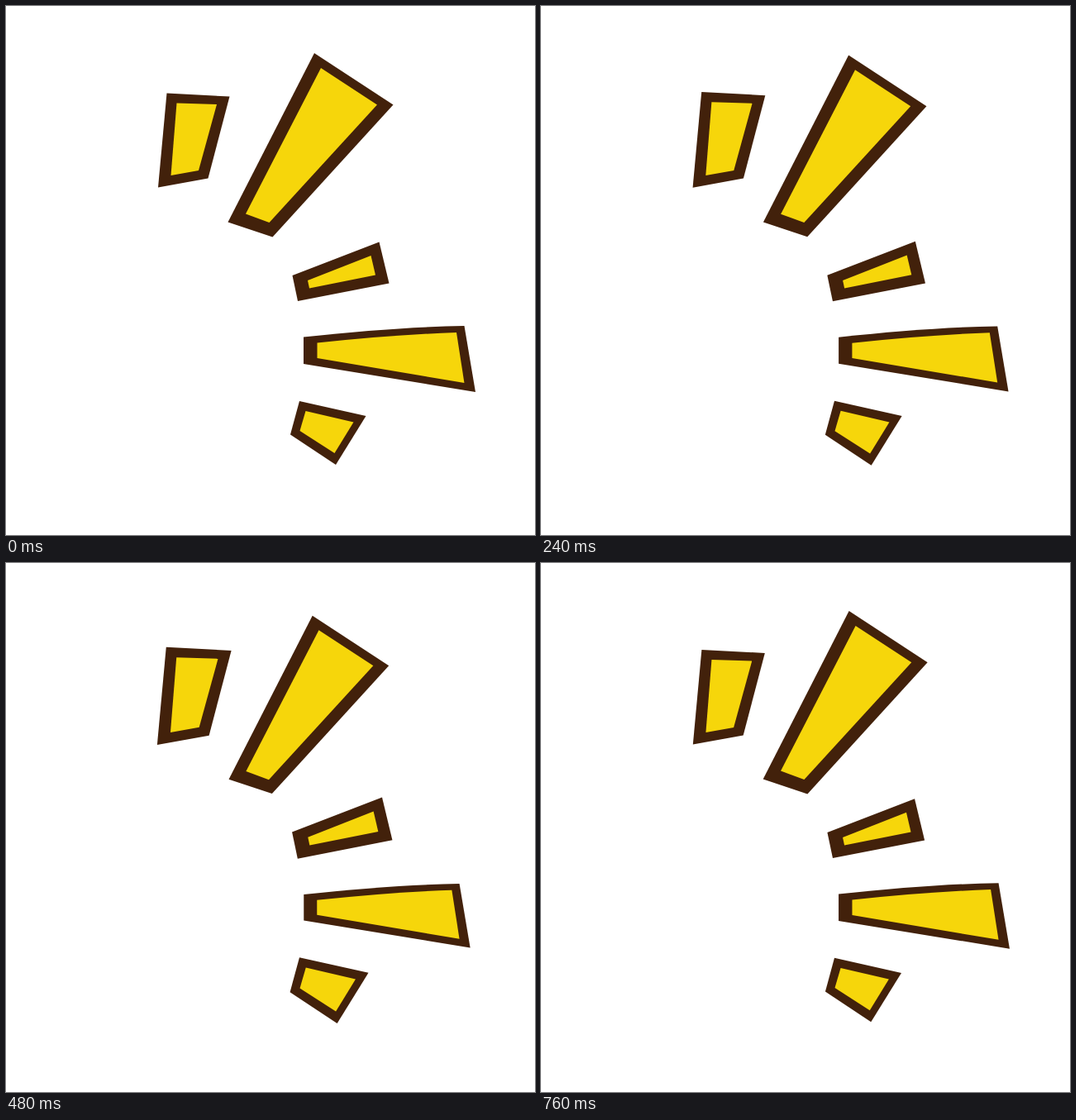
Recreate the animation shown at these times as an HTML page without scripts. Size 640 by 640 pixels, loop 0.8 s.

```html
<!DOCTYPE html>
<html lang="en">
<head>
<meta charset="utf-8">
<title>Burst rays</title>
<style>
  @property --tick { syntax: "<number>"; inherits: true; initial-value: 0; }

  html, body { margin: 0; width: 100%; height: 100%; overflow: hidden; background: #fff; }
  svg { display: block; width: 100%; height: 100%; animation: tick 800ms steps(20) infinite; }

  /* Each ray pulses around its own pivot, 6.4 ticks per beat. */
  .ray {
    --wave: cos((var(--tick) * 0.15625 - 0.05) * 1turn);
    transform: scale(calc(var(--mid) + var(--swing) * var(--wave)));
  }
  .grow { --mid: 1.071; --swing: -0.0747; }
  .shrink { --mid: 0.939; --swing: 0.064; }
  .rim { fill: #42210b; }
  .core { fill: #f6d60b; }

  @keyframes tick { from { --tick: 0; } to { --tick: 20; } }
</style>
</head>
<body>
<svg viewBox="0 0 640 640">
  <g class="ray grow" style="transform-origin: 214px 205px">
    <path class="rim" d="M194.5 105.5 270.5 109.5 244.5 208.5 184 219.5Z"/>
    <path class="core" d="M206.5 117.5 255 119 233 199 199.5 205Z"/>
  </g>
  <g class="ray shrink" style="transform-origin: 302px 267px">
    <path class="rim" d="M373 57 468.5 119.5 322.5 279.5 268.5 261.5Z"/>
    <path class="core" d="M381 75 449 119.5 318.5 262 290 251.5Z"/>
  </g>
  <g class="ray grow" style="transform-origin: 357.5px 340px">
    <path class="rim" d="M451.5 285.5 463.5 335.5 353 357 346.5 326Z"/>
    <path class="core" d="M441.5 302 447 325.5 367 341.5 365 332Z"/>
  </g>
  <g class="ray shrink" style="transform-origin: 368.5px 418px">
    <path class="rim" d="M360 400.5Q470 388.5 554.5 387L568 467 360 433Z"/>
    <path class="core" d="M376.5 407.5Q470 397.5 545 395L554.5 456 376.5 426Z"/>
  </g>
  <g class="ray grow" style="transform-origin: 355px 501px">
    <path class="rim" d="M355 478 435.5 496 399 555 344 518.5Z"/>
    <path class="core" d="M362.5 490 420.5 503.5 397.5 541 355.5 514Z"/>
  </g>
</svg>
</body>
</html>
```
